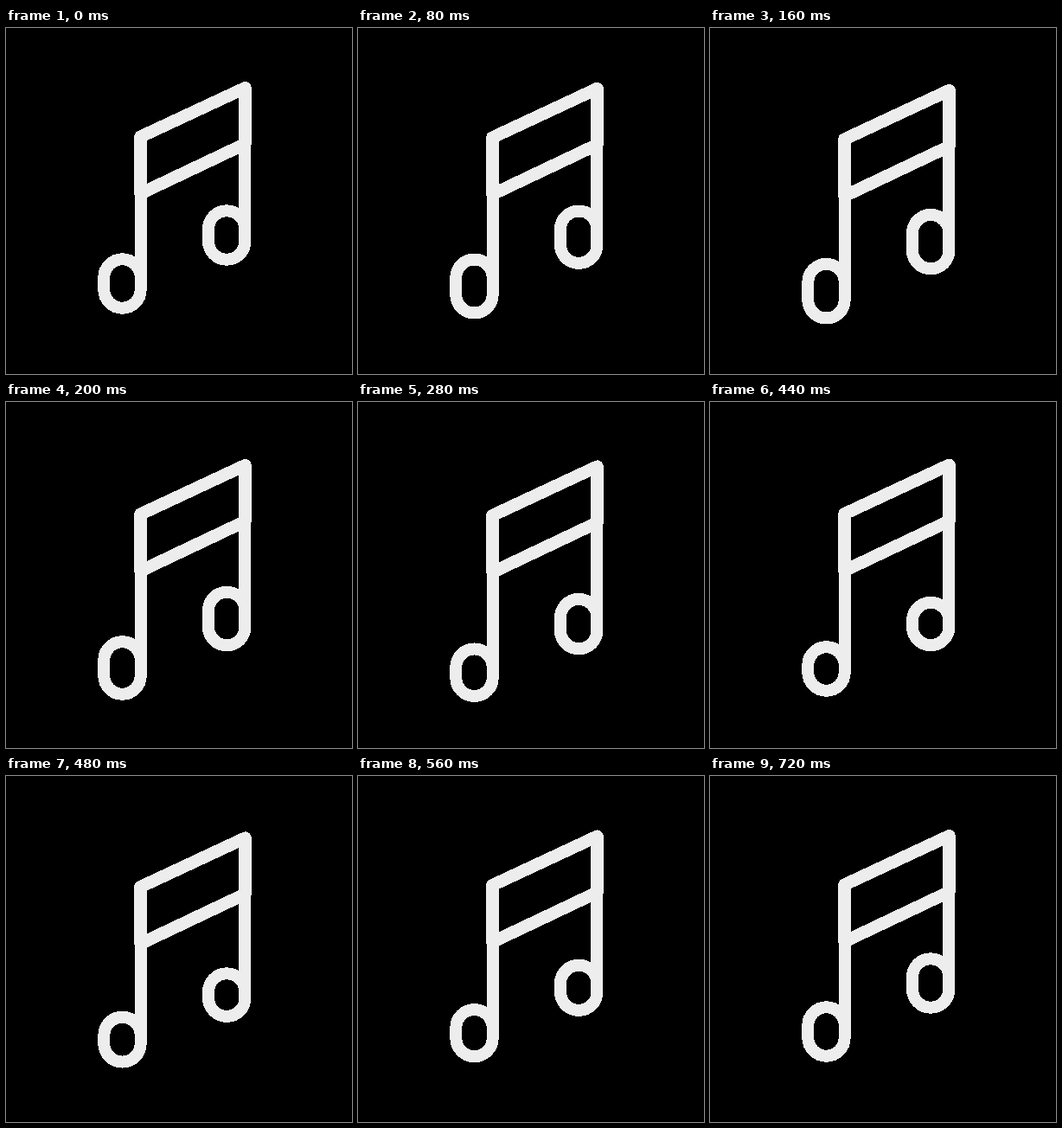
Write an HTML page that moves like this. It is 400x400 px and loops after 0.8 s.

```html
<!DOCTYPE html>
<html lang="en">
<head>
<meta charset="utf-8">
<title>Music note</title>
<style>
  html, body { margin: 0; height: 100%; overflow: hidden; background: #000; }
  svg { display: block; width: 100vw; height: 100vh; }
  g { fill: none; stroke: #ededed; stroke-width: 14; stroke-linejoin: round; shape-rendering: crispEdges; }
</style>
</head>
<body>
<svg viewBox="0 0 400 400">
  <g>
    <path id="frame" stroke-width="14.4" d="M155.5 125.7 276.5 69.2V134L155.5 191.4Z"/>
    <path id="stemL"/>
    <path id="stemR"/>
    <rect id="headL"/>
    <rect id="headR"/>
  </g>
</svg>
<script>
const LOOP = 800, STEP = 40, LAST = 720, HEAD = 42.4;
const el = id => document.getElementById(id);

// Rises from 0 at start to size at peak, then falls back to 0 at end.
function swell(t, size, start, peak, end, power = 2) {
  if (t <= start || t >= end) return 0;
  const u = t < peak ? (t - start) / (peak - start) : (end - t) / (end - peak);
  return size * Math.sin(u * Math.PI / 2) ** power;
}

// The stem runs along the head's right side, centred on x.
function placeNote(side, x, stemTop, top, bottom) {
  const box = { x: x - HEAD, y: top, width: HEAD, height: bottom - top, rx: HEAD / 2 };
  box.ry = Math.min(box.rx, box.height / 2);
  for (const k in box) el('head' + side).setAttribute(k, box[k]);
  el('stem' + side).setAttribute('d', `M${x} ${stemTop}V${(top + bottom) / 2}`);
}

function draw(now) {
  const t = Math.min(LAST, Math.floor(now % LOOP / STEP) * STEP);
  const drop = swell(t, 5.6, 0, 315, 620);
  el('frame').setAttribute('transform', `translate(0 ${drop})`);
  placeNote('L', 155.7, 190 + drop,
    267.3 + swell(t, 21, 60, 350, 625),
    323.7 + swell(t, 16.3, 0, 290, 570, 1.2));
  placeNote('R', 276.4, 134 + drop,
    211.3 + swell(t, 22.2, 60, 390, 670),
    267.7 + swell(t, 18.2, 0, 325, 620, 1.5));
}

const start = performance.now();
function tick() {
  draw(performance.now() - start);
  requestAnimationFrame(tick);
}
tick();
</script>
</body>
</html>
```
